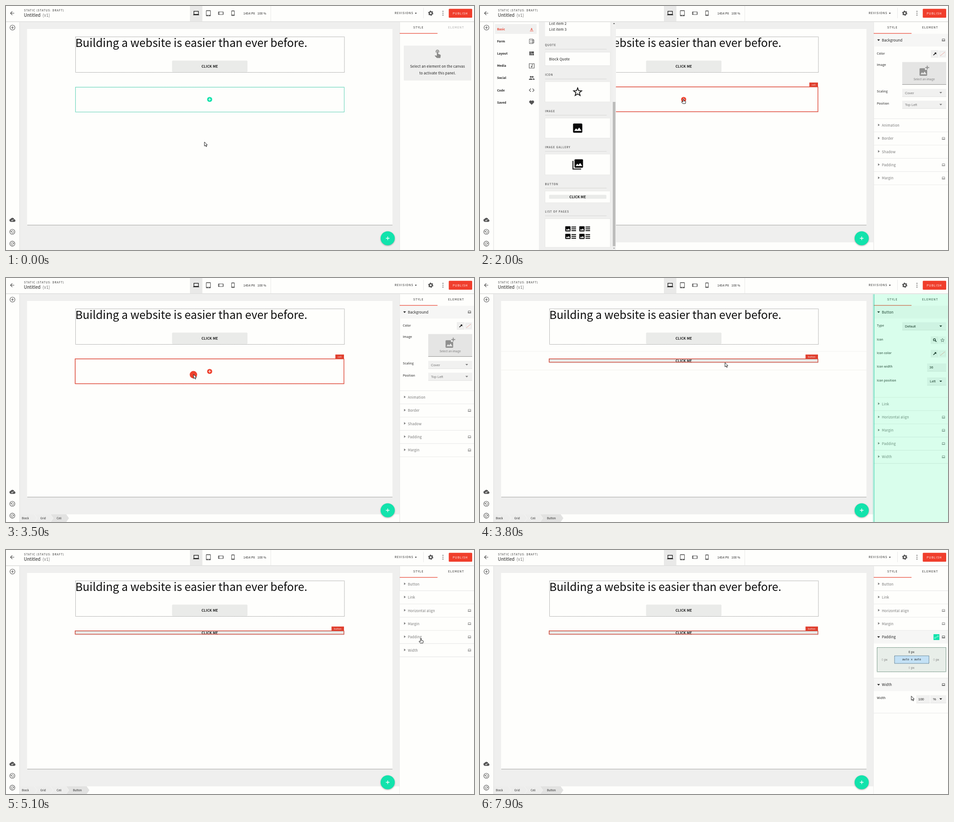
An HTML page for the animation above (8000 ms loop, 1033x542 px).

```html
<!DOCTYPE html>
<html>
<head>
<meta charset="utf-8">
<title>Page builder</title>
<style>
  html, body { margin: 0; width: 100%; height: 100%; overflow: hidden; background: #efefee; }
  svg { display: block; width: 1033px; height: 542px; font-family: "Noto Sans CJK JP", "Noto Sans CJK SC", "Noto Sans CJK KR", "Open Sans", sans-serif; }
  text { fill: #1c1c1c; white-space: pre; }
  .mid { text-anchor: middle; }
  .title { font-size: 24.8px; fill: #0c0c0c; }
  .name { font-size: 9.63px; }
  .caps { font-size: 5.78px; letter-spacing: 1.08px; }
  .tab { font-size: 6.27px; letter-spacing: 1.08px; font-weight: 500; }
  .row { font-size: 7.7px; letter-spacing: .19px; }
  .lab { font-size: 6.74px; letter-spacing: .15px; }
  .small { font-size: 6.27px; letter-spacing: .05px; }
  .crumb { font-size: 5.78px; letter-spacing: .12px; }
  .tag { font-size: 4.85px; letter-spacing: .2px; fill: #fff; text-anchor: middle; }
  .btn { font-size: 7.7px; letter-spacing: .15px; font-weight: 700; text-anchor: middle; }
  .item { font-size: 6.74px; font-weight: 700; }
  .field { font: 7.53px "Liberation Sans", Arial, sans-serif; }
  .mono { font: 6.3px "DejaVu Sans Mono", monospace; text-anchor: middle; }
  .dim { fill: #777; }
  .pale { fill: #a5a5a5; }
  .red { fill: #e8402f; }
  .white { fill: #fff; }
  .lifted { filter: drop-shadow(0 1px 1.8px rgba(0, 0, 0, .35)); }
</style>
</head>
<body>
<svg id="stage" viewBox="0 0 1033 542"></svg>
<script>
const WHITE = '#fefefc', GRAY = '#efefee', TEAL = '#12e3ac', RED = '#ee412e', INK = '#555';
const LOOP = 8000, STEP = 100;

const rect = (x, y, w, h, fill, more = '') => `<rect x="${x}" y="${y}" width="${w}" height="${h}" fill="${fill}" ${more}/>`;
const text = (x, y, cls, s) => `<text x="${x}" y="${y}" class="${cls}">${s}</text>`;
const fill = (d, color, more = '') => `<path d="${d}" fill="${color}" ${more}/>`;
const line = (d, color, w = 1, more = '') => `<path d="${d}" fill="none" stroke="${color}" stroke-width="${w}" ${more}/>`;
const disc = (x, y, r, color, more = '') => `<circle cx="${x}" cy="${y}" r="${r}" fill="${color}" ${more}/>`;
const ring = (x, y, r, color, w, more = '') => disc(x, y, r, 'none', `stroke="${color}" stroke-width="${w}" ${more}`);
const group = (id, body) => `<g id="${id}">${body}</g>`;
// spans: "from-to from-to" in ms
const during = (spans, body) => `<g data-on="${spans}">${body}</g>`;
const at = (x, y, k, body) => `<g transform="translate(${x} ${y}) scale(${k})">${body}</g>`;
const dashed = (x, y, w, h, color, bg = 'none') => rect(x, y, w, h, bg, `stroke="${color}" stroke-width=".9" stroke-dasharray="2 1.1"`);
const plus = (x, y, r, color, w) => line(`M${x - r} ${y}h${2 * r}M${x} ${y - r}v${2 * r}`, color, w);
const hline = (x, y, w, color = '#e4e4e3') => line(`M${x} ${y}h${w}`, color, .8);
const down = (x, y, color = '#111') => fill(`M${x - 3} ${y - 1.5}h6l-3 3.2z`, color);

const laptop = (x, y, k, color) => at(x, y, k,
  line('M-5-4h10v7h-10z', color, 1.2) + rect(-6.5, 3.4, 13, 1.3, color));
const phone = (x, y, turn) => `<g transform="translate(${x} ${y}) rotate(${turn})">` +
  rect(-3.6, -6, 7.2, 12, INK, 'rx="1.4"') + rect(-2.5, -4.3, 5, 7.6, WHITE) + disc(0, 4.6, .7, WHITE) + '</g>';
const photo = (x, y, r, color, bg) => rect(x - r, y - r, 2 * r, 2 * r, color, `rx="${r / 5}"`) +
  fill(`M${x - r * .75} ${y + r * .6}l${r * .4} ${-r * .55} ${r * .28} ${r * .33} ${r * .4} ${-r * .5} ${r * .5} ${r * .72}z`, bg);
const star = (x, y, r, color, w) => {
  const pts = [...Array(10)].map((_, i) => {
    const a = i * Math.PI / 5, q = i % 2 ? r * .42 : r;
    return `${(x + q * Math.sin(a)).toFixed(2)},${(y - q * Math.cos(a)).toFixed(2)}`;
  });
  return `<polygon points="${pts.join(' ')}" fill="none" stroke="${color}" stroke-width="${w}"/>`;
};

function topBar() {
  return rect(0, 0, 1033, 34, WHITE) + rect(0, 34, 1033, 1, '#dededd') + rect(0, 35, 1033, 1, '#e9e9e8') +
    line('M18.2 16H10M14 11.8L9.8 16l4.2 4.2', '#444', 1.1) +
    text(40, 12.2, 'caps', 'STATIC (STATUS: DRAFT)') +
    text(39.5, 24.3, 'name', 'Untitled') + text(80.5, 24.3, 'name dim', '(v1)') +
    rect(406, 0, 27.5, 34, '#e9e9e8') + line('M584.5 0v34M921.5 4v23', '#e9e9e8') +
    laptop(419.7, 15.6, 1, '#111') +
    rect(441.5, 9.6, 10.4, 13, INK, 'rx="1.3"') + rect(442.6, 11.2, 8.2, 8.7, WHITE) + disc(446.7, 21.2, .7, WHITE) +
    phone(474.2, 16, 90) + phone(501, 16, 0) +
    text(524, 18.6, 'lab', '1454 PX') + text(555, 18.6, 'lab', '100 %') +
    text(858, 18.4, 'tab', 'REVISIONS') + fill('M902.6 15h4l-2 2.4z', '#222') +
    ring(937.5, 16, 3.3, INK, 2.6) + ring(937.5, 16, 4.9, INK, 1.6, 'stroke-dasharray="2.56"') +
    [11.8, 16, 20.2].map(y => disc(964.5, y, 1.1, INK)).join('') +
    rect(977.3, 6.2, 51.7, 19.8, '#f03e2c', 'rx="1.5"') + text(986, 18.5, 'tab white', 'PUBLISH');
}

function leftBar() {
  const turn = (y, flip) => at(14, y, 1, ring(0, 0, 5.6, INK, 1.1) +
    `<g transform="scale(${flip} 1)">` + line('M-2.2-.8a2.6 2.6 0 1 1 .2 2.4', INK, 1) + fill('M-3.4-2.6v3h3z', INK) + '</g>');
  const cloud = 'M19.35 10.04C18.67 6.59 15.64 4 12 4 9.11 4 6.6 5.64 5.35 8.04 2.34 8.36 0 10.91 0 14c0 3.31 2.69 6 6 6h13c2.76 0 5-2.24 5-5 0-2.64-2.05-4.78-4.65-4.96z';
  return rect(0, 36, 30, 506, WHITE) + rect(29.5, 36, 1, 506, '#dededd') +
    ring(14.3, 48, 5.5, INK, 1.1) + plus(14.3, 48, 3, INK, 1.1) +
    at(7.6, 468.4, .55, fill(cloud, INK) +
      during('0-5900 6400-8000', line('M7.5 13l3 3 5.5-5.7', WHITE, 2)) +
      during('5900-6400', fill('M14 13v4h-4v-4H7l5-5 5 5z', WHITE))) +
    turn(501.6, 1) + turn(528, -1);
}

function cellFrame(color, h, tag, w) {
  return rect(152.5, 179.5, 593.3, h, 'none', `stroke="${color}" stroke-width="1.2"`) +
    rect(746 - w, 170, w, 10, color) + text(746 - w / 2, 176.8, 'tag', tag);
}

function canvas() {
  const addDot = color => disc(449.5, 207.5, 5.6, color) + plus(449.5, 207.5, 2.9, '#fff', 1.2);
  const cellEdge = color => dashed(153.5, 180.5, 593, 55, color);
  return rect(47, 52, 806, 435.5, '#d2d2d1') + rect(47, 486, 806, 1, '#b0b0af') + rect(46.5, 51, 806.5, 435, WHITE) +
    dashed(153.5, 68.5, 593.5, 79, '#888') +
    text(153, 90.8, 'title', 'Building a website is easier than ever before.') +
    rect(366.5, 121.3, 166.5, 25.5, '#eaebe9', 'rx="2"') + text(449.7, 136.6, 'btn', 'CLICK ME') +
    during('0-400', rect(153.3, 180.2, 593.2, 55.3, 'none', 'stroke="#8eeed6" stroke-width="1"') + cellEdge('#3dbd9f')) +
    during('400-1200', cellEdge('#7fdcc4') + cellFrame(TEAL, 55.2, 'cell', 19) + addDot(TEAL)) +
    during('1200-3600', cellEdge('#e09a92') + cellFrame('#e0402f', 55.2, 'cell', 19) + addDot(RED)) +
    during('0-400', addDot(TEAL)) +
    during('3600-4300', hline(47, 163, 806, '#ececea') + hline(47, 204.5, 806, '#ececea')) +
    during('3600-8000', rect(153, 180, 593.5, 8, '#eaebe9') + text(449.7, 186.6, 'btn', 'CLICK ME') +
      dashed(153.5, 180.5, 593, 7.5, '#999') + cellFrame('#e0402f', 7.5, 'button', 27.5));
}

function crumbs() {
  const trail = items => items.map(([s, x, left, tip], i) => {
    const last = i === items.length - 1, notch = i ? 6 : 0;
    return fill(`M${left - 6} 525H${tip - 6}l6 8.5-6 8.5H${left - 6}l${notch}-8.5z`, last ? '#e2e2e1' : '#ededec') +
      (last ? '' : line(`M${tip - 6} 525l6 8.5-6 8.5`, WHITE, 1)) + text(x, 535.8, 'crumb', s);
  }).join('');
  const base = [['Block', 35, 36, 69], ['Grid', 76, 69, 104.5], ['Cell', 112, 104.5, 139]];
  return during('1200-8000', rect(30, 525, 839, 17, WHITE)) +
    during('1200-3600', trail(base)) +
    during('3600-8000', trail([...base, ['Button', 148, 139, 184]]));
}

function sidebar() {
  const icons = [
    text(114, 54, 'item red mid', 'A') + hline(110, 55.6, 8, RED),
    line('M109 73.5h8v10h-8zM111 76.5h2.5M111 80.5h2.5M115 76h1v1.2h-1zM115 80h1v1.2h-1zM117 75h2v7h-2', INK, 1),
    rect(109, 101, 3, 8.5, INK) + rect(112.6, 101, 6.4, 4, INK) + rect(112.6, 105.6, 2.9, 4, INK) + rect(116.1, 105.6, 2.9, 4, INK),
    line('M108.6 128h11v10h-11z', INK, 1.1) + line('M115 135v-5h2', INK, 1.1) + disc(114, 135, 1.4, INK),
    disc(112, 157.5, 2, INK) + disc(116.2, 157.5, 2, INK) + fill('M108 164v-1.6q4-3.4 8 0v1.6zM117 164v-2q-.2-1-1-1.6 4 0 4.4 2.2v1.4z', INK),
    line('M112.2 183.5l-3.4 3.5 3.4 3.5M116 183.5l3.4 3.5-3.4 3.5', INK, 1.2),
    fill('M114 219.5l-4.8-4.7c-2.2-2.8 2-7.2 4.8-3.8 2.8-3.4 7 1 4.8 3.8z', INK)
  ];
  const menu = ['Basic', 'Form', 'Layout', 'Media', 'Social', 'Code', 'Saved']
    .map((s, i) => text(37.7, 53.6 + i * 27.2, i ? 'item' : 'item red', s) + icons[i]).join('');
  const card = (label, y, top, h) => text(143.5, y + 2.1, 'caps', label) + hline(143.5, y + 9, 136, '#d0d0cf') +
    rect(143.5, top, 144, h, WHITE, 'stroke="#e3e3e2" stroke-width=".8"');
  const page = (x, y) => photo(x, y, 5.8, '#080808', WHITE) +
    [-4, 0, 4].map(d => rect(x + 8, y + d - 1, 10, 2, '#080808')).join('');
  return rect(30, 35, 100, 507, WHITE) + rect(33, 40, 92, 22, '#f0f0ef') + menu +
    rect(130, 35, 170, 507, GRAY) + rect(143.5, 20, 144, 47, WHITE) +
    text(152.5, 41.6, 'row', 'List item 2') + text(152.5, 55.2, 'row', 'List item 3') +
    card('QUOTE', 87, 102.5, 30) + text(152.5, 120.8, 'row', 'Block Quote') +
    card('ICON', 153.2, 168, 45) + star(215.5, 191.3, 9.4, '#111', 1.7) +
    card('IMAGE', 233.5, 249, 44.5) + photo(215.6, 271.3, 10.2, '#080808', WHITE) +
    card('IMAGE GALLERY', 314, 329, 46) + line('M205.2 344v18.2h18', '#080808', 2) + photo(218, 349.8, 9.4, '#080808', WHITE) +
    card('BUTTON', 395.5, 411, 26) + rect(152.5, 419.4, 126.5, 8.8, '#eaebe9', 'rx="1.5"') + text(215.6, 426.8, 'btn', 'CLICK ME') +
    card('LIST OF PAGES', 457, 472.5, 63.5) + page(194, 495) + page(225, 495) + page(194, 511.8) + page(225, 511.8) +
    rect(292, 35, 8, 507, '#f1f1f0') + rect(293, 213, 6, 320.5, '#bdbdbc') +
    fill('M293.6 40h4.4l-2.2-2.4z', INK) + fill('M293.6 537h4.4l-2.2 2.4z', '#999');
}

const select = (x, y, w, s, cls = '') => rect(x, y, w, 17.6, '#f1f1f0') + hline(x, y + 17.4, w, '#dcdcdb') +
  text(x + 6, y + 11.6, 'field ' + cls, s) + down(1017, y + 8.6, cls ? '#777' : '#111');
const closed = (y, s, device) => fill(`M878.6 ${y - 3.6}l3.6 2.8-3.6 2.8z`, '#777') + text(887, y + 2.9, 'row dim', s) +
  (device ? laptop(1023, y - .3, .55, INK) : '') + hline(869, y + 14.7, 164);
const opened = (y, s, device) => rect(869, y - 14.2, 164, 28.4, '#f6f6f5') + down(879.8, y) + text(887, y + 2.9, 'row', s) +
  (device ? laptop(1023, y - .3, .55, '#111') : '');
const swatch = (y, left) => rect(995, y, 17, 17, '#efefee') + rect(1013, y, 16, 17, '#f4f4f3') + left;
const dropper = y => line(`M1000.8 ${y + 2.8}l4.2-4.2`, '#111', 1.5) + line(`M1004 ${y - 2.8}l3 3M1004.8 ${y - 1}l2-2`, '#111', 1.7);
const noColor = y => line(`M1016 ${y + 4}l10-8`, '#e88c80', .8) + rect(1015, y - 5, 12, 10, 'none', 'stroke="#ddd" stroke-width=".6"');
const labels = list => list.map(([y, s]) => text(876, y + 2.5, 'lab', s)).join('');
const sheet = y => rect(869, y, 164, 542, WHITE);

function cellPanel() {
  return opened(75.8, 'Background', 1) + labels([[105, 'Color'], [130.6, 'Image'], [189.8, 'Scaling'], [216.2, 'Position']]) +
    swatch(98, dropper(106.5) + noColor(106.5)) +
    rect(932, 124.5, 97, 50, '#e5e5e4') + hline(932, 174.4, 97, '#777') +
    photo(978.6, 146.6, 8.4, '#8f8f8e', '#e5e5e4') + rect(982, 132, 10, 10, '#e5e5e4') + plus(987.2, 136.8, 4.3, '#8f8f8e', 1.9) +
    text(980.3, 165.3, 'small mid dim', 'Select an image') +
    select(932, 184, 97, 'Cover', 'dim') + select(932, 210.4, 97, 'Top Left', 'dim') + hline(869, 250.3, 164) +
    ['Animation', 'Border', 'Shadow', 'Padding', 'Margin'].map((s, i) => closed(265 + i * 29.35, s, i % 2 || i === 4)).join('');
}

function buttonPanel() {
  const px = (x, y, cls) => `<text x="${x}" y="${y}" class="lab mid dim"><tspan class="${cls}">0</tspan> px</text>`;
  return during('3600-4800', opened(75.8, 'Button')) + during('4800-8000', closed(75.8, 'Button')) +
    group('buttonBody', labels([[105, 'Type'], [136, 'Icon'], [166.2, 'Icon color'], [196.2, 'Icon width'], [227, 'Icon position']]) +
      select(932, 98.4, 97, 'Default') +
      swatch(129.6, ring(1003, 137.2, 2.3, '#111', 1.2) + line('M1004.8 139l2.6 2.6', '#111', 1.5) + star(1020.8, 138.4, 4.2, INK, .8)) +
      swatch(159.6, dropper(168) + noColor(168)) +
      rect(987, 189.8, 42, 17.6, '#f1f1f0') + hline(987, 207.2, 42, '#dcdcdb') + text(992, 201.2, 'field', '36') +
      select(987, 220.8, 42, 'Left')) +
    group('middle', sheet(90.5) + hline(869, 90.4, 164) + closed(105.2, 'Link') + closed(134.6, 'Horizontal align', 1) + closed(163.9, 'Margin', 1) +
      during('3600-5400', closed(193.3, 'Padding', 1)) +
      during('5400-8000', opened(193.3, 'Padding', 1) + rect(1001, 187, 13, 13, TEAL) +
        line('M1006.4 194.8l-1.5 1.5a1 1 0 0 1-1.5-1.5l2-2M1008.6 192.2l1.5-1.5a1 1 0 0 1 1.5 1.5l-2 2M1006 195l3-3', '#fff', .8)) +
      dashed(876.5, 216.6, 152, 54, '#2a5c45', '#e8eee9') + dashed(915, 235, 76, 17, '#234a66', '#c3e1f5') +
      text(952.8, 245.2, 'mono', 'auto x auto') +
      text(952.3, 228.5, 'lab mid', '0 px') + px(893, 246, 'pale') + px(1007, 246, 'pale') + px(952.3, 263.8, 'pale')) +
    group('width', sheet(208) + hline(869, 208, 164) +
      during('3600-6300', closed(222.7, 'Width', 1)) + during('6300-8000', opened(222.7, 'Width', 1)) +
      labels([[252.4, 'Width']]) + rect(963, 246, 30, 17.6, '#f1f1f0') + hline(963, 263.4, 30, '#dcdcdb') +
      text(967.5, 257.6, 'field', '100') + select(994, 246, 35, '%')) +
    group('end', sheet(237.4) + hline(869, 237.4, 164));
}

function panel() {
  const touch = 'M9 11.24V7.5C9 6.12 10.12 5 11.5 5S14 6.12 14 7.5v3.74c1.21-.81 2-2.18 2-3.74C16 5.01 13.99 3 11.5 3S7 5.01 7 7.5c0 1.56.79 2.93 2 3.74zm9.84 4.63l-4.54-2.26c-.17-.07-.35-.11-.54-.11H13v-6c0-.83-.67-1.5-1.5-1.5S10 6.67 10 7.5v10.74l-3.43-.72c-.4-.05-.75.02-1.03.3l-.79.8 4.94 4.94c.27.27.65.44 1.06.44h6.79c.75 0 1.33-.55 1.44-1.28l.75-5.27c.1-.7-.3-1.3-.89-1.58z';
  return rect(868.5, 35, 165, 507, WHITE) + rect(868.5, 35, .9, 507, '#dededd') +
    during('0-1200', rect(878, 88, 149, 77.5, GRAY, 'rx="1"') + at(942.2, 94.4, .88, fill(touch, '#8a8a89')) +
      text(952.6, 136.5, 'row mid', 'Select an element on the canvas') + text(952.6, 152, 'row mid', 'to activate this panel.')) +
    during('1200-3600', cellPanel()) + during('3600-8000', buttonPanel()) +
    text(899, 50.3, 'tab', 'STYLE') +
    during('0-1200', text(976, 50.3, 'tab pale', 'ELEMENT')) + during('1200-8000', text(976, 50.3, 'tab', 'ELEMENT')) +
    rect(869, 60.2, 83.5, 1.2, '#e8402f') +
    group('flash', rect(869, 35, 164, 507, 'rgba(30,255,150,.16)') + rect(866.5, 35, 2.5, 507, 'rgba(18,227,172,.18)') +
      rect(869, 35, 1.8, 507, 'rgba(18,200,160,.45)'));
}

function pointer() {
  const style = 'stroke="#111" stroke-width=".95" stroke-linejoin="round"';
  return group('cursor', during('2800-3600', disc(-.3, .8, 8.2, RED)) +
    group('arrow', fill('M0 0V9.2L2.1 7.3 3.7 10.6 5.2 9.9 3.7 6.8 6.5 6.7z', '#fff', style)) +
    group('hand', fill('M-1 .8Q-1-.4 0-.4T1 .8V3.8L4 4.4Q5.3 4.8 5.1 6.2L4.3 9.8H-1.6L-4.2 6.4Q-4.4 5.2-3.2 5.4L-1 6.2z', '#fff', style)));
}

const stage = document.getElementById('stage');
stage.innerHTML = rect(0, 0, 1033, 542, GRAY) + canvas() + crumbs() +
  disc(842.5, 516, 15.6, TEAL, 'class="lifted"') + plus(842.5, 516, 4, '#fff', 1.3) +
  group('sidebar', sidebar()) + leftBar() + panel() + topBar() + pointer();

const $ = id => document.getElementById(id);
const within = (t, spans) => spans.some(([a, b]) => t >= a && t < b);
const timed = [...stage.querySelectorAll('[data-on]')]
  .map(el => [el, el.dataset.on.split(' ').map(s => s.split('-').map(Number))]);
const ramp = (t, a, b) => { const k = Math.min(1, Math.max(0, (t - a) / (b - a))); return k * k * (3 - 2 * k); };
const show = (el, on) => { el.style.display = on ? '' : 'none'; };
const shift = (id, x, y) => $(id).setAttribute('transform', `translate(${x} ${y})`);

// time, x, y
const path = [[0, 438, 302], [700, 449, 207], [2000, 449, 207], [2600, 213, 424], [2700, 213, 424],
  [3300, 412, 215], [3500, 414, 214], [3600, 414, 214], [4200, 903, 114], [4600, 902, 76], [4700, 902, 76],
  [5100, 916, 197], [5400, 916, 197], [6100, 912, 300], [6300, 912, 300], [6800, 964, 238],
  [6900, 964, 238], [7100, 942, 218], [7200, 942, 218], [7900, 952, 324.5], [8000, 952, 324.5]];
const handSpans = [[500, 2100], [2500, 2700], [4500, 5700], [6000, 6500]];

function spot(t) {
  const i = path.findIndex(p => p[0] > t);
  const [a, x, y] = path[i - 1], [b, u, v] = path[i], k = ramp(t, a, b);
  return [x + (u - x) * k, y + (v - y) * k];
}

function render(ms) {
  const t = Math.floor(ms % LOOP / STEP) * STEP;
  timed.forEach(([el, spans]) => show(el, within(t, spans)));

  const side = ramp(t, 1700, 2000) - ramp(t, 2700, 3000);
  show($('sidebar'), side > 0);
  shift('sidebar', -270 * (1 - side), 0);

  const body = 174.7 * (1 - ramp(t, 4700, 5000));
  const pad = 76.5 * ramp(t, 5300, 5600);
  const wide = 48.4 * ramp(t, 6200, 6500);
  shift('middle', 0, body);
  shift('width', 0, body + pad);
  shift('end', 0, body + pad + wide);
  show($('buttonBody'), body > 0);
  $('flash').style.opacity = ramp(t, 3500, 3800) - ramp(t, 4300, 4600);

  const hand = within(t, handSpans);
  show($('hand'), hand);
  show($('arrow'), !hand);
  shift('cursor', ...spot(t));
}

let start;
function tick(now) {
  start ??= now;
  render(now - start);
  requestAnimationFrame(tick);
}
render(0);
requestAnimationFrame(tick);
</script>
</body>
</html>
```
